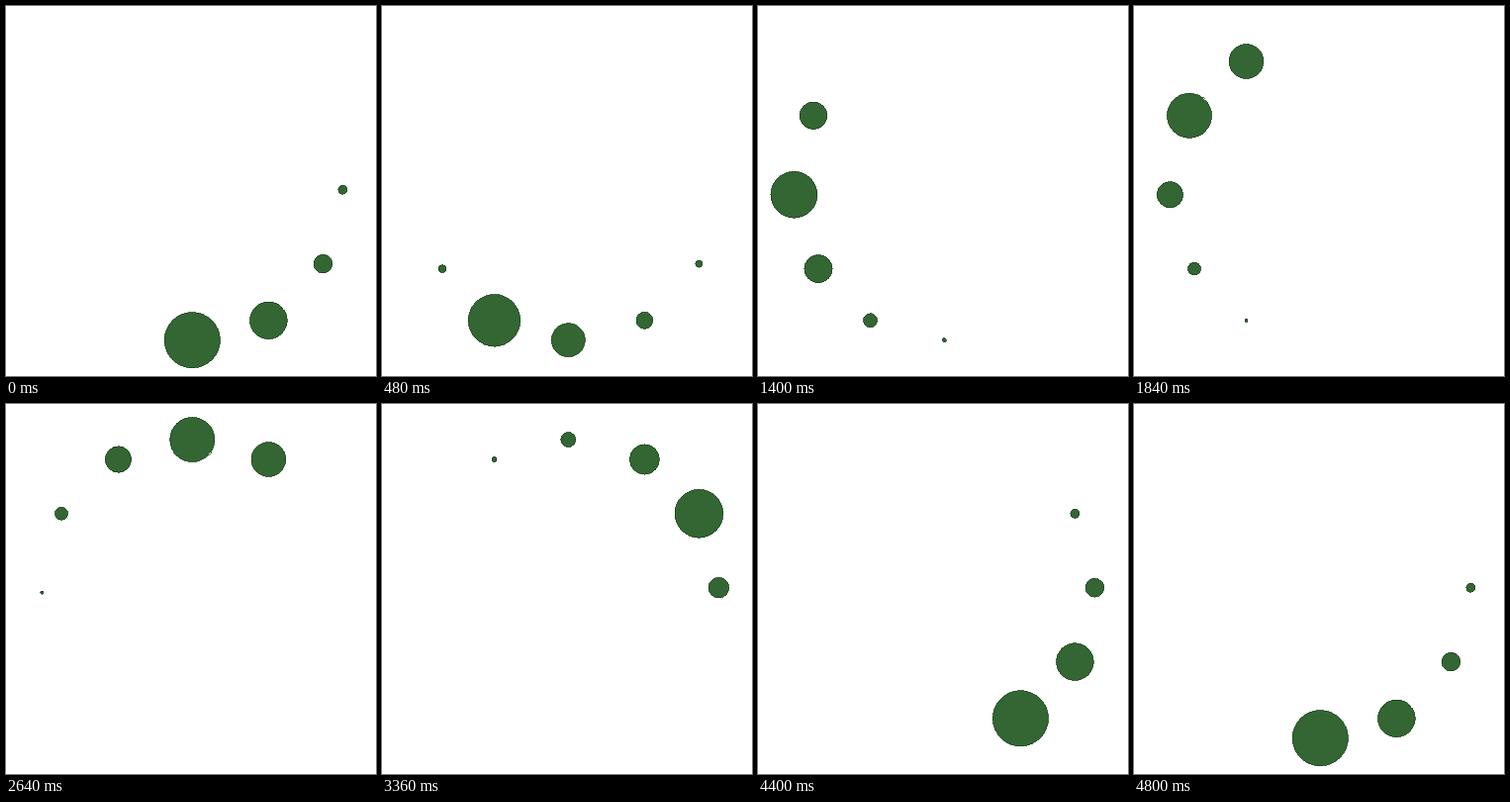
Write an HTML page that moves like this. It is 374x374 px and loops after 4880 ms.

```html
<!DOCTYPE html>
<html lang="en">
<head>
<meta charset="utf-8">
<title>Circling dots</title>
<style>
html, body { margin: 0; width: 100%; height: 100%; overflow: hidden; background: #fff; }
svg { display: block; width: 100vw; height: 100vh; }
circle { fill: #336633; stroke: #1f401f; stroke-width: 0.8; shape-rendering: crispEdges; }
</style>
</head>
<body>
<svg id="stage" viewBox="0 0 374 374"></svg>
<script>
const LOOP = 4880, TURN = 4800, TICK = 40, COUNT = 12, STEP = TURN / COUNT;
const LINE = 0.8;

// grid lines the ring passes through; the ring runs clockwise from the bottom
const cols = [36.4, 56, 113.5, 188.3, 265.4, 320.4, 340.4];
const rows = [36, 56, 110.8, 185.7, 260.6, 317.8, 337.7];
// two dots on the left sit a little off the grid
const nudge = { 2: [5, 5], 3: [0, 5] };

// outer radius at the peak and after each further step
const fade = [28.5, 19.2, 9.8, 4.9, 0];

const stage = document.getElementById("stage");
const dots = Array.from({ length: COUNT }, (_, i) => {
  const [dx, dy] = nudge[i] || [0, 0];
  const dot = document.createElementNS("http://www.w3.org/2000/svg", "circle");
  dot.setAttribute("cx", cols[6 - Math.abs(6 - (i + 9) % COUNT)] + dx);
  dot.setAttribute("cy", rows[Math.abs(6 - i)] + dy);
  stage.append(dot);
  return dot;
});

// age is counted in steps: -1 to 0 grows, 0 to 4 shrinks
function radius(age) {
  if (age < 0) {
    const p = age + 1;
    const smooth = p * p * (3 - 2 * p);
    return fade[0] * (p + smooth) / 2;
  }
  const k = Math.floor(age);
  if (k >= fade.length - 1) return 0;
  return fade[k] + (fade[k + 1] - fade[k]) * (age - k);
}

function draw(now) {
  const t = Math.min(TURN, Math.floor((now % LOOP) / TICK) * TICK);
  dots.forEach((dot, i) => {
    const age = (t / STEP - i + 1 + COUNT) % COUNT - 1;
    const r = radius(age);
    dot.setAttribute("r", Math.max(0, r - LINE / 2));
    dot.style.display = r > 0.5 ? "" : "none";
  });
}

const start = performance.now();
function frame() {
  draw(performance.now() - start);
  requestAnimationFrame(frame);
}
frame();
</script>
</body>
</html>
```
